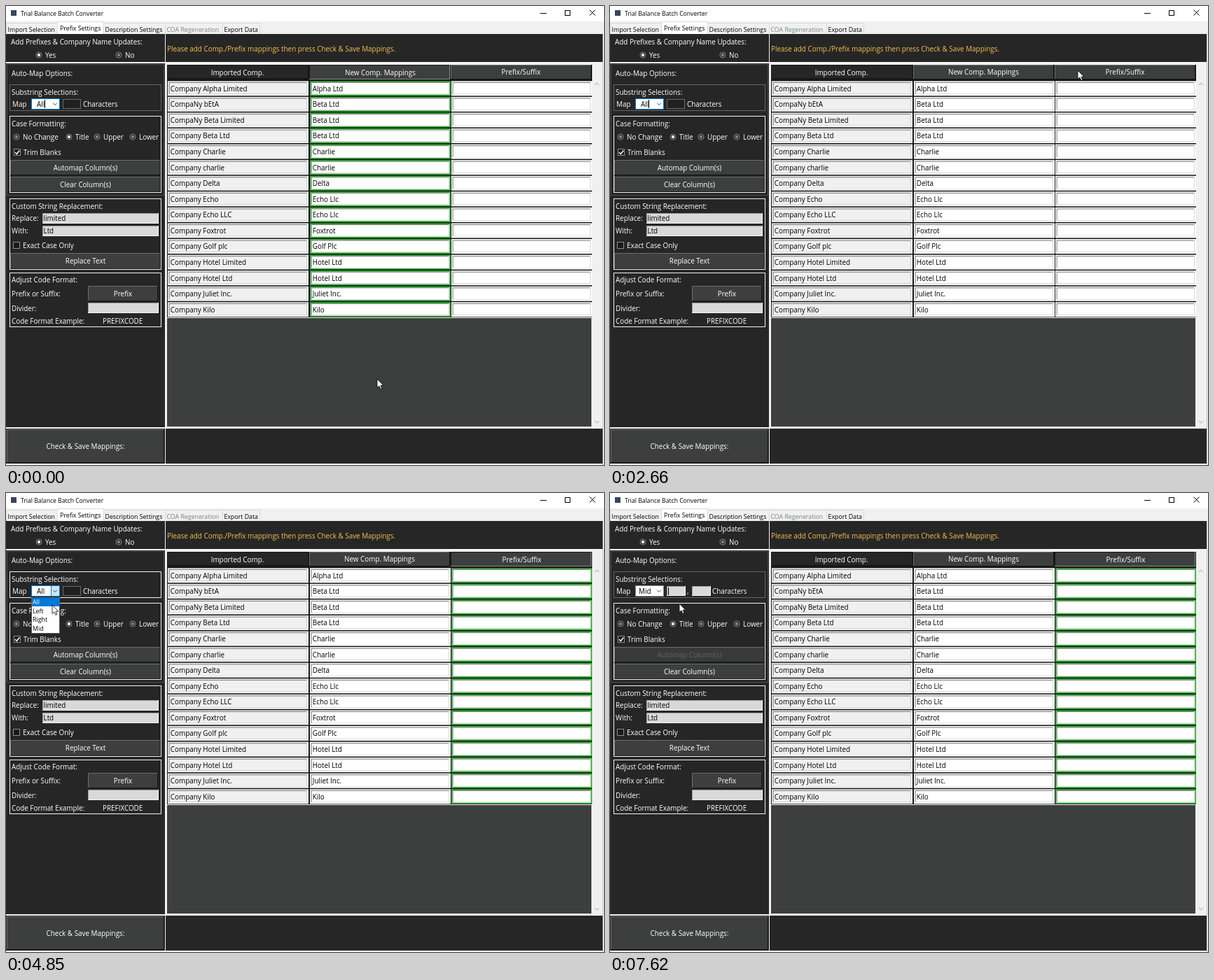
An HTML page that plays this animation: 854 px wide and 656 px high, repeating every 8 s.

```html
<!DOCTYPE html>
<html lang="en">
<head>
<meta charset="utf-8">
<title>Batch converter</title>
<style>
  html, body { margin: 0; width: 100%; height: 100%; overflow: hidden; background: #fff; }
  svg { display: block; width: 854px; height: 656px; font: 9.9px "Open Sans", "Noto Sans", sans-serif; }
  rect, .crisp { shape-rendering: crispEdges; }
  .soft rect { shape-rendering: auto; }
  text { white-space: pre; }
</style>
</head>
<body>
<svg id="stage" viewBox="0 0 854 656"></svg>
<script>
const NS = 'http://www.w3.org/2000/svg';
const stage = document.getElementById('stage');
const DARK = '#262626', BTN = '#3d3f3f', PALE = '#f0f0f0', GREEN = '#2aad2e', BLUE = '#0078d7';
let parent = stage;

function el(tag, attrs) {
  const node = document.createElementNS(NS, tag);
  for (const k in attrs) node.setAttribute(k, attrs[k]);
  return parent.appendChild(node);
}
function group(draw) {
  const outer = parent, g = el('g', {});
  parent = g;
  draw();
  parent = outer;
  return g;
}
const box = (x, y, width, height, fill) => el('rect', { x, y, width, height, fill });
const line = (d, stroke, w = 1) => el('path', { d, stroke, 'stroke-width': w, fill: 'none' });
function frame(x, y, w, h, stroke) {
  return el('rect', { x: x + .5, y: y + .5, width: w - 1, height: h - 1, fill: 'none', stroke });
}
// y is the middle of the capitals; baselines sit on whole pixels
function label(x, y, str, fill = '#fff', size = 9.9, anchor = 'start') {
  const t = el('text', { x, y: Math.round(y + 3.6), fill, 'font-size': size, 'text-anchor': anchor });
  t.textContent = str;
  return t;
}
const mid = (x, y, str, fill) => label(x, y, str, fill, 9.9, 'middle');

function bevel(x, y, w, h, fill, light, shade) {
  box(x, y, w, h, shade);
  box(x, y, w - 1, h - 1, light);
  box(x + 1, y + 1, w - 2, h - 2, fill);
}
function button(x, y, w, h, str, fill = BTN, color = '#fff') {
  bevel(x, y, w, h, fill, '#6b6d6d', '#161616');
  mid(x + w / 2, y + h / 2, str, color);
}
function pressed(x, y, w, h, str, fill = BTN, color = '#fff') {
  bevel(x, y, w, h, fill, '#161616', '#8a8a8a');
  mid(x + w / 2 + 1, y + h / 2 + 1, str, color);
}
function entry(x, y, w, h, str = '') {
  bevel(x, y, w, h, '#d9d9d9', '#9a9a9a', '#f4f4f4');
  label(x + 1.5, y + h / 2, str, '#000');
}
function radio(x, y, str, on) {
  el('circle', { cx: x, cy: y, r: 4, fill: '#1c1c1c', stroke: '#8c8c8c' });
  el('circle', { cx: x, cy: y, r: 2.2, fill: on ? '#fff' : '#858585' });
  label(x + 9, y + .5, str);
}
function check(x, y, str, on) {
  box(x, y, 10, 10, '#191919');
  frame(x, y, 10, 10, '#8c8c8c');
  if (on) line(`M${x + 2} ${y + 5}l2.3 2.5 4-5`, '#fff', 1.5);
  label(x + 14, y + 5, str);
}

function titleBar() {
  box(0, 0, 854, 22, '#fff');
  box(7, 6, 8, 8, '#3a4460');
  label(21, 10, 'Trial Balance Batch Converter', '#000', 8.65);
  line('M763 10.5h9', '#000');
  frame(798, 6, 8, 8, '#000');
  line('M833.5 5.5l8 8m0-8l-8 8', '#000');
  box(0, 22, 854, 18, PALE);
  const tabs = [[0, 73, 'Import Selection'], [73, 66, 'Prefix Settings'], [139, 88, 'Description Settings'],
    [227, 82, 'COA Regeneration'], [309, 53, 'Export Data']];
  tabs.forEach(([x, w, str], i) => {
    const on = i === 1, top = on ? 22 : 24;
    box(x, top, w, 40 - top, on ? '#fff' : PALE);
    line(`M${x + .5} 40V${top + .5}h${w}V40`, '#dadada').classList.add('crisp');
    label(x + (on ? 4 : 2.5), on ? 31 : 33, str, i === 3 ? '#73877a' : '#000', 8.8);
  });
}

function leftSide() {
  box(0, 40, 227, 40, DARK);
  label(7, 51, 'Add Prefixes & Company Name Updates:');
  radio(47, 70, 'Yes', true);
  radio(161, 70, 'No');

  box(0, 82, 227, 520, DARK);
  frame(1, 83, 225, 188, '#4c4c4c');
  label(8, 96.5, 'Auto-Map Options:');
  label(8, 123, 'Substring Selections:');
  label(9, 140.5, 'Map');

  frame(5, 157, 217, 110, '#f4f4f4');
  label(8, 168, 'Case Formatting:');
  radio(15, 187, 'No Change');
  radio(90, 187, 'Title', true);
  radio(130, 187, 'Upper');
  radio(181, 187, 'Lower');
  check(11, 204, 'Trim Blanks', true);
  button(6, 244, 215, 22, 'Clear Column(s)');

  frame(5, 275, 217, 102, '#f4f4f4');
  label(8, 286, 'Custom String Replacement:');
  label(8, 303.5, 'Replace:');
  entry(52, 296, 166, 15, 'limited');
  label(8, 321.5, 'With:');
  entry(52, 314, 166, 15, 'Ltd');
  check(10, 337, 'Exact Case Only');
  button(6, 353, 215, 23, 'Replace Text');

  frame(5, 381, 217, 78, '#f4f4f4');
  label(8, 391.5, 'Adjust Code Format:');
  label(8, 411, 'Prefix or Suffix:');
  button(117, 400, 100, 22, 'Prefix');
  label(8, 432, 'Divider:');
  entry(117, 424, 101, 15);
  label(8, 450, 'Code Format Example:');
  label(138, 450, 'PREFIXCODE');

  box(0, 604, 227, 50, DARK);
  button(1, 605, 225, 48, 'Check & Save Mappings:');
}

const ROWS = [
  ['Company Alpha Limited', 'Alpha Ltd'], ['CompaNy bEtA', 'Beta Ltd'], ['CompaNy Beta Limited', 'Beta Ltd'],
  ['Company Beta Ltd', 'Beta Ltd'], ['Company Charlie', 'Charlie'], ['Company charlie', 'Charlie'],
  ['Company Delta', 'Delta'], ['Company Echo', 'Echo Llc'], ['Company Echo LLC', 'Echo Llc'],
  ['Company Foxtrot', 'Foxtrot'], ['Company Golf plc', 'Golf Plc'], ['Company Hotel Limited', 'Hotel Ltd'],
  ['Company Hotel Ltd', 'Hotel Ltd'], ['Company Juliet Inc.', 'Juliet Inc.'], ['Company Kilo', 'Kilo']
];
const rims = { 1: [], 2: [] };

function cells() {
  ROWS.forEach((row, i) => {
    const cy = 117.8 + i * 22.57, y = cy - 10.5;
    [231, 434, 636].forEach((x, c) => {
      const fill = c ? '#fff' : PALE;
      const rim = box(x, y, 201, 21, fill);
      if (c) rims[c].push(rim);
      bevel(x + 1.6, y + 1.6, 197.8, 17.8, fill, '#777', '#f2f2f2');
      if (row[c]) label(x + 3.8, cy + .3, row[c], '#000');
    });
  });
}

function table() {
  box(228, 40, 624, 40, DARK);
  label(230, 61, 'Please add Comp./Prefix mappings then press Check & Save Mappings.', '#f5c04e');
  box(228, 82, 624, 520, PALE);
  box(230, 84, 607, 361, '#181818');
  box(230, 446, 606, 155, BTN);
  bevel(230, 84, 202, 20, DARK, '#161616', '#161616');
  mid(330.5, 95.5, 'Imported Comp.');
  group(cells).classList.add('soft');
  line('M841 113l3-3 3 3M841 593l3 3 3-3', '#c9bfa0', 1.2);
  box(228, 604, 624, 50, DARK);
}

box(0, 0, 854, 656, '#f4f4f4');
titleBar();
leftSide();
table();
box(852, 40, 1, 616, '#bdbdbd');

const headers = [[433, 'New Comp. Mappings'], [635, 'Prefix/Suffix']].map(([x, str]) => ({
  raised: group(() => button(x, 84, 201, 21, str)),
  sunken: group(() => pressed(x, 84, 201, 21, str)),
  active: group(() => pressed(x, 84, 201, 21, str, '#ececec', '#000'))
}));

const substring = frame(5, 112, 217, 38, '#666');
const automap = group(() => button(6, 220, 215, 22, 'Automap Column(s)'));
const automapOff = group(() => button(6, 220, 215, 22, 'Automap Column(s)', '#393b3b', '#626464'));
const oneField = group(() => {
  box(81, 133, 26, 14, '#202020');
  frame(81, 133, 26, 14, '#6a6a6a');
  label(110, 140.5, 'Characters');
});
const twoFields = group(() => {
  entry(81, 133, 27, 14);
  label(110, 140.5, ',');
  entry(117, 133, 27, 14);
  label(146, 140.5, 'Characters');
});

box(36, 132, 41, 16, '#fff');
const comboRim = frame(36, 132, 41, 16, BLUE);
const arrowGlow = group(() => {
  box(64, 133, 12, 14, '#cce4f7');
  frame(64, 132, 13, 16, BLUE);
});
line('M67.2 138.7l2.8 2.8 2.8-2.8', '#444');
const allText = label(44, 140.5, 'All', '#000');
const midMark = box(40, 134, 18, 12, BLUE);
const midText = label(41, 140.5, 'Mid', '#000');
const comboCaret = box(55, 134, 1, 12, '#000');
const fieldCaret = box(83, 135, 1, 11, '#000');

const ROW_H = 12.5;
const items = [];
let choice;
const popup = group(() => {
  box(36, 149, 41, 52, '#fff');
  frame(36, 149, 41, 52, '#5a5a5a');
  choice = box(37, 150, 39, 12, BLUE);
  ['All', 'Left', 'Right', 'Mid'].forEach((str, i) =>
    items.push(label(38, 155.5 + i * ROW_H, str, '#000', 8.8)));
});

const ring = el('circle', { r: 10, fill: '#f2e04a', 'fill-opacity': .85 });
const arrow = el('path', {
  d: 'M0 0V12.5L2.9 9.9 4.9 14.4 6.9 13.5 5 9.2H8.8Z',
  fill: '#fff', stroke: '#000', 'stroke-width': .8
});
const beam = el('path', { d: 'M-3-6h2.2L0-5.3.8-6H3M0-5.3V5.3M-3 6h2.2L0 5.3.8 6H3', fill: 'none', stroke: '#000' });

// pointer stops: ms, x, y
const PATH = [
  [610, 530, 533], [730, 523, 490], [850, 520, 425], [950, 528, 362], [1060, 548, 287], [1160, 570, 220],
  [1260, 588, 171], [1410, 600, 122], [1440, 602, 110], [1580, 602, 90],
  [2100, 602, 90], [2300, 622, 91], [2660, 668, 92], [2820, 671, 92],
  [3200, 671, 92], [3350, 610, 98], [3550, 450, 115], [3730, 351, 127],
  [3810, 345, 128], [4050, 230, 136], [4300, 120, 140], [4610, 70, 139],
  [4740, 70, 139], [4850, 66, 160], [5100, 63, 172], [5400, 59, 190],
  [5870, 59, 191], [6100, 72, 172], [6480, 97, 139],
  [6900, 97, 139], [7120, 99, 148], [7410, 98, 157], [7620, 99, 158]
];
// clicks: from, to
const CLICKS = [[1650, 1900], [2960, 3150], [4610, 4750], [5460, 5800], [6520, 6650]];

function pointer(t) {
  const n = PATH.findIndex(p => p[0] > t);
  if (n < 0) return PATH[PATH.length - 1].slice(1);
  if (!n) return PATH[0].slice(1);
  const [t0, x0, y0] = PATH[n - 1], [t1, x1, y1] = PATH[n];
  const k = (t - t0) / (t1 - t0);
  return [x0 + (x1 - x0) * k, y0 + (y1 - y0) * k];
}
const show = (node, on) => node.setAttribute('visibility', on ? 'inherit' : 'hidden');
const paint = (node, fill) => node.setAttribute('fill', fill);
const within = (t, a, b) => t >= a && t < b;
const blink = (t, start) => (t - start + 900) % 900 < 600;

function setHeader(h, state) {
  for (const name in h) show(h[name], name === state);
}

function render(t) {
  const selected = t < 1900 ? 1 : t < 3150 ? 0 : 2;
  const open = within(t, 4690, 5800), chosen = t >= 5800, inField = t >= 6500;
  setHeader(headers[0], within(t, 1650, 1900) ? 'active' : selected === 1 ? 'sunken' : 'raised');
  setHeader(headers[1], within(t, 2960, 3150) ? 'active' : selected === 2 ? 'sunken' : 'raised');
  for (const c of [1, 2]) rims[c].forEach(r => paint(r, selected === c ? GREEN : '#fff'));

  substring.setAttribute('stroke', within(t, 4300, 5800) ? '#f4f4f4' : '#666');
  show(automap, !chosen);
  show(automapOff, chosen);
  show(oneField, !chosen);
  show(twoFields, chosen);
  comboRim.setAttribute('stroke', inField ? '#8a8a8a' : BLUE);
  show(arrowGlow, within(t, 4560, 5800));
  show(allText, !chosen);
  show(midText, chosen);
  show(midMark, chosen && !inField);
  paint(midText, inField ? '#000' : '#fff');
  show(comboCaret, t < 4610 && blink(t, 750));
  show(fieldCaret, inField && blink(t, 6500));

  const [x, y] = pointer(t);
  show(popup, open);
  const pick = Math.max(0, Math.min(3, Math.floor((y - 149.5) / ROW_H)));
  choice.setAttribute('y', Math.round(150 + pick * ROW_H));
  items.forEach((item, i) => paint(item, i === pick ? '#fff' : '#000'));

  const overText = (x > 231 && x < 837 && y > 107 && y < 444) ||
    (chosen && x > 81 && x < 108 && y > 133 && y < 147);
  const place = `translate(${x.toFixed(1)} ${y.toFixed(1)})`;
  for (const node of [ring, arrow, beam]) node.setAttribute('transform', place);
  show(ring, CLICKS.some(([a, b]) => within(t, a, b)));
  show(arrow, !overText);
  show(beam, overText);
}

const begin = performance.now();
function tick() {
  render((performance.now() - begin) % 8000);
  requestAnimationFrame(tick);
}
tick();
</script>
</body>
</html>
```
